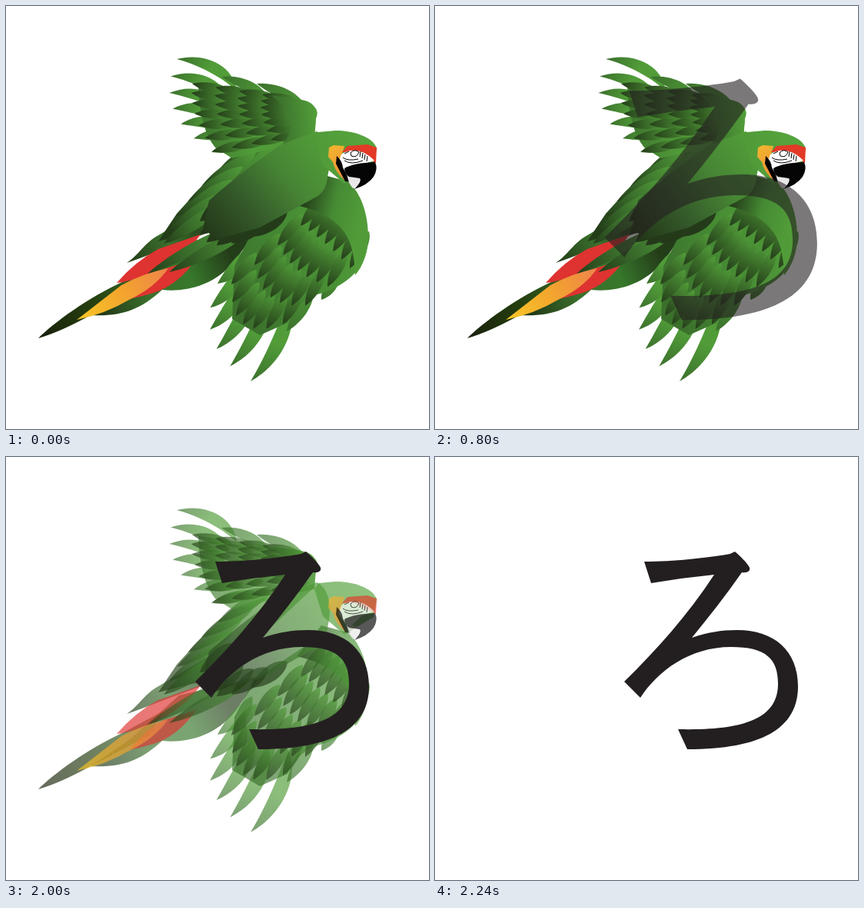
Animation of 550 by 550 pixels, one loop 3080 ms. Source, as an HTML page with a canvas:

```html
<!DOCTYPE html>
<html lang="ja">
<head>
<meta charset="utf-8">
<title>ろ</title>
<style>
  html, body { margin: 0; width: 100%; height: 100%; overflow: hidden; background: #fff; }
  canvas { display: block; }
</style>
</head>
<body>
<canvas id="stage" width="550" height="550"></canvas>
<script>
const ctx = document.getElementById('stage').getContext('2d');
const LOOP = 3080, STEP = 40;
const INK = '#231f20', DARK = '#243d19', MID = '#3b702c', GREEN = '#519c39', RED = '#de3330';
const parrot = [];

const mix = (a, b, u) => a + (b - a) * u;
const mixPoint = (p, q, u) => p.map((v, i) => mix(v, q[i], u));
const curvePoint = ([a, b, c], u) => mixPoint(mixPoint(a, b, u), mixPoint(b, c, u), u);

function gradient([x0, y0], [x1, y1], colors) {
  const g = ctx.createLinearGradient(x0, y0, x1, y1);
  colors.forEach((c, i) => g.addColorStop(i / (colors.length - 1), c));
  return g;
}

function shape(d, fill) {
  parrot.push({ path: new Path2D(d), fill });
}

function line(d, width) {
  parrot.push({ path: new Path2D(d), width });
}

// A leaf: bend pushes its middle sideways, colors run from tip to base.
function feather(tip, reach, half, colors = [DARK, GREEN], bend = 0) {
  const base = [tip[0] + reach[0], tip[1] + reach[1]];
  const len = Math.hypot(...reach);
  const normal = [reach[1] / len, -reach[0] / len];
  const at = (u, side) => mixPoint(base, tip, u).map((v, i) => v + normal[i] * side);
  shape(`M${base}C${at(.2, bend + half * 1.3)} ${at(.68, bend + half * 1.2)} ${tip}` +
        `C${at(.68, bend - half * 1.2)} ${at(.2, bend - half * 1.3)} ${base}Z`,
        gradient(tip, base, colors));
}

// Feathers with their tips along a quadratic curve; reach and bend change from first to last.
function row(count, tips, half, reach, colors, bend = [0, 0]) {
  for (let i = count - 1; i >= 0; i--) {
    const u = i / (count - 1);
    feather(curvePoint(tips, u), mixPoint(...reach, u), half, colors, mix(...bend, u));
  }
}

// Overlapping rows, from the outer tip curve to the inner one.
function coverts(rows, count, outer, inner, half, reach) {
  for (let r = 0; r < rows; r++) {
    const tips = outer.map((p, i) => mixPoint(p, inner[i], r / (rows - 1)));
    row(count, tips, half, reach);
  }
}

function tail() {
  shape('M110 402C150 404 175 395 203 369C232 372 270 365 298 331L330 285L225 310L160 368Z',
        gradient([130, 400], [290, 320], [DARK, MID, '#37782b', DARK]));
  shape('M42 432C62 412 105 380 155 357L205 330L186 362L110 402Q70 424 42 432Z',
        gradient([42, 432], [190, 345], ['#19200c', '#25400f', MID]));
  shape('M157 334C175 322 178 309 200 297L262 260L270 292L200 318Q175 328 157 334Z',
        gradient([160, 332], [260, 280], [DARK, MID, DARK]));
  shape('M144 360Q168 332 198 316L253 297Q232 328 186 348Q164 358 144 360Z', RED);
  shape('M160 381Q182 354 205 342L247 329Q225 362 192 373Q175 378 160 381Z', RED);
  shape('M92 408L150 363Q180 347 211 341Q194 366 160 382Q130 400 92 408Z',
        gradient([95, 405], [208, 343], ['#f8c526', '#f3a52e', '#ee8549']));
  feather([184, 348], [110, -60], 8, [DARK, MID, GREEN]);
  feather([212, 346], [105, -55], 9, [DARK, MID, GREEN]);
}

function rump() {
  shape('M198 306L222 270L262 226L296 196L345 180L400 170L330 235L262 290Z',
        gradient([215, 295], [350, 185], [DARK, MID, GREEN]));
  row(6, [[205, 309], [218, 265], [275, 215]], 9, [[75, -50], [70, -42]], [DARK, MID, GREEN]);
}

function upperWing() {
  row(7, [[222, 69], [189, 138], [267, 190]], 8, [[78, 42], [62, -12]], [MID, GREEN, GREEN], [17, 3]);
  feather([280, 92], [60, 27], 7, [MID, GREEN], 5);
  feather([326, 101], [64, 32], 8, [MID, GREEN], 5);
  shape('M250 103L330 114C358 121 390 119 400 130Q407 137 403 146L401 170L345 186L294 198L272 184Q252 160 250 103Z',
        gradient([250, 130], [400, 145], [MID, GREEN, GREEN]));
  coverts(4, 7, [[242, 101], [235, 135], [268, 189]], [[333, 115], [325, 138], [344, 174]],
          7, [[52, 11], [50, -11]]);
  shape('M345 116C378 121 394 121 400 130Q407 137 403 146L401 172L358 181Q388 150 345 116Z',
        gradient([355, 150], [402, 145], [MID, GREEN]));
}

function lowerWing() {
  row(6, [[275, 361], [240, 443], [318, 488]], 10, [[45, -50], [48, -108]], [MID, GREEN, GREEN], [-6, -17]);
  feather([365, 423], [34, -60], 9, [MID, GREEN], -3);
  feather([410, 382], [22, -32], 8, [MID, GREEN]);
  shape('M390 245C440 235 470 264 471 302Q470 352 412 373Q382 379 366 412L330 428L294 407L297 338L322 290Z',
        gradient([300, 370], [466, 300], [MID, '#468b34', GREEN]));
  coverts(4, 7, [[293, 362], [290, 440], [360, 414]], [[383, 286], [414, 306], [447, 341]],
          8, [[33, -41], [25, -48]]);
}

function body() {
  shape('M410 219L444 228C458 239 471 264 471 301Q470 331 454 350C453 303 440 274 378 259Z',
        gradient([388, 250], [465, 270], [DARK, '#468b34', GREEN]));
  row(6, [[252, 280], [248, 330], [318, 300]], 11, [[48, -38], [48, -34]], ['#233819', DARK]);
  shape('M404 163C420 170 425 196 418 222Q417 240 404 248L330 288L275 303L256 290L264 253C300 221 330 199 358 180Z',
        gradient([265, 302], [412, 180], ['#233819', '#34592a', '#478534', GREEN]));
}

function head() {
  shape('M401 172L406 164L428 162C452 162 477 170 482 185L478 208L440 231L412 207Z',
        gradient([410, 185], [480, 180], [GREEN, '#56a63e']));
  shape('M420 184L426 181L440 182L433 207L442 228Q428 217 425 203L419 196Z',
        gradient([420, 185], [442, 215], ['#f2b42e', '#ed9238']));
  shape('M437 190L444 182L470 180L482 184L481 204L453 190Z', '#e23a27');
  shape('M436 193C446 185 464 185 479 201L463 206L445 223L432 204Z', '#fff');
  shape('M430 195Q437 201 438 210L448 229L441 228L429 205Z', '#000');
  shape('M443 217L462 222L457 234L451 237Q445 231 443 217Z', '#e9e7e7');
  shape('M440 211Q452 204 480 203Q484 212 478 222Q470 233 453 238Q463 228 460 224L446 222Q440 218 440 211Z', '#050505');
  line('M448 191Q453 185 459 190Q456 198 449 195ZM438 197Q444 202 458 199M440 201Q449 207 464 201M440 192L446 189', 1);
  for (let i = 0; i < 4; i++) line(`M${461 + i * 3} ${189 + i * 2}l-1 7`, 1);
}

const glyph = new Path2D(
  'M272 136C310 136 354 131 378 127Q385 126 390 123C397 129 405 137 408 142C412 148 406 151 399 150' +
  'C378 180 356 208 334 235C354 228 372 225 393 225C441 225 472 252 472 298C472 353 425 380 328 380' +
  'L316 354C402 356 446 340 446 295C446 262 430 247 385 247C331 247 290 278 267 313L246 292' +
  'C288 251 329 205 363 153Q322 157 281 164Z');

function drawGlyph(step) {
  const scale = mix(1.5, 1, step / 9);
  ctx.save();
  ctx.translate(360, 251.5);
  ctx.scale(scale, scale);
  ctx.translate(-360, -251.5);
  ctx.globalAlpha = (step + 1) / 10;
  ctx.fillStyle = INK;
  ctx.fill(glyph);
  ctx.restore();
}

// Every piece fades on its own, so overlaps stay denser than single layers.
function drawParrot(alpha) {
  ctx.globalAlpha = alpha;
  for (const { path, fill, width } of parrot) {
    if (width) {
      ctx.lineWidth = width;
      ctx.strokeStyle = '#000';
      ctx.stroke(path);
    } else {
      ctx.fillStyle = fill;
      ctx.fill(path);
    }
  }
}

function draw(now) {
  const t = now % LOOP;
  const zoom = Math.min(9, Math.floor((t - 600) / STEP));
  const fade = Math.max(0, Math.min(9, Math.floor((t - 1920) / STEP) + 1));
  ctx.clearRect(0, 0, 550, 550);
  if (fade < 9) drawParrot(1 - fade / 9);
  if (zoom >= 0) drawGlyph(zoom);
}

[tail, rump, upperWing, lowerWing, body, head].forEach(build => build());

const start = performance.now();
(function tick() {
  draw(performance.now() - start);
  requestAnimationFrame(tick);
})();
</script>
</body>
</html>
```
